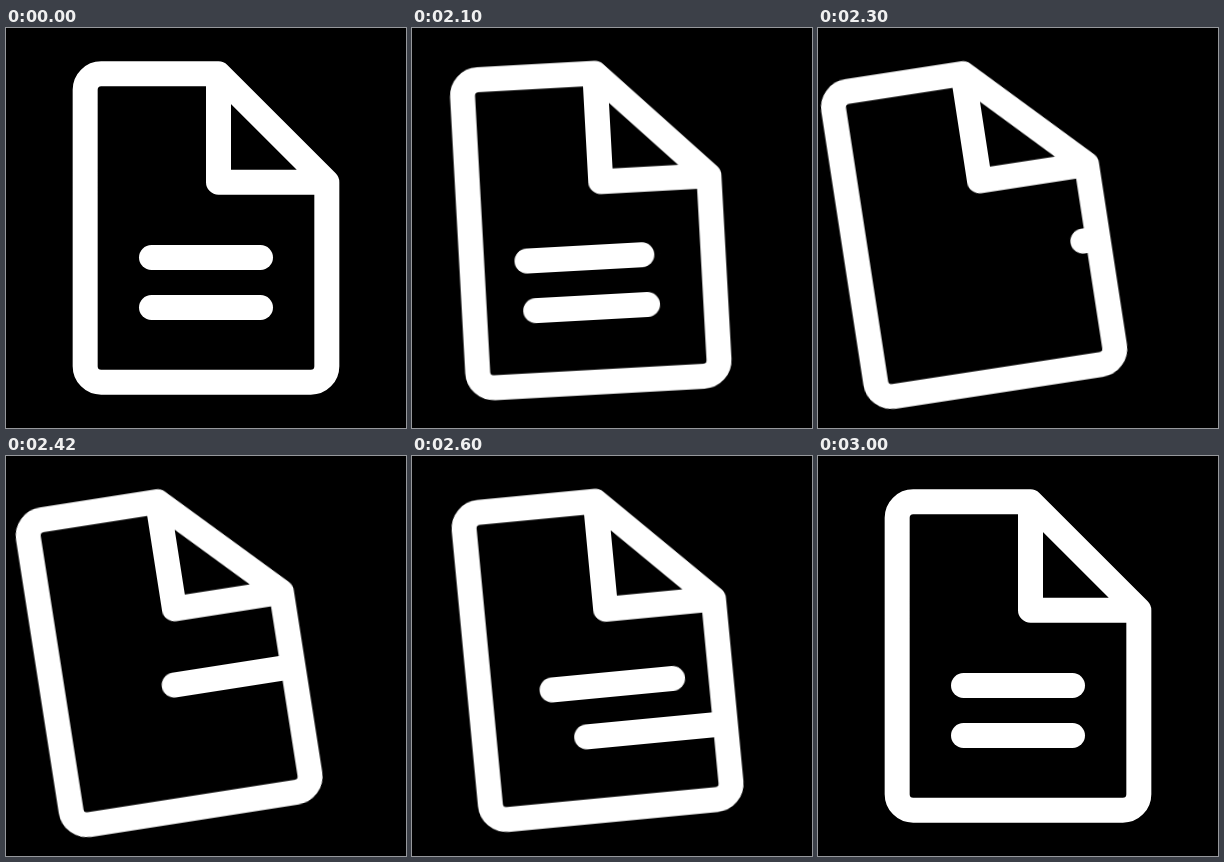
Recreate the animation shown at these times as an HTML page. Size 400 px wide and 400 px high, loop 3020 ms.

```html
<!DOCTYPE html>
<html lang="en">
<head>
<meta charset="utf-8">
<title>Document icon</title>
<style>
  html, body {
    margin: 0;
    width: 100%;
    height: 100%;
    overflow: hidden;
    background: #000;
  }

  .stage {
    position: relative;
    width: 100%;
    height: 100%;
    overflow: clip;
    contain: paint;
  }

  .doc, .lines, svg {
    position: absolute;
    left: 0;
    top: 0;
    width: 400px;
    height: 400px;
  }

  .doc, .line {
    animation-duration: 3020ms;
    animation-iteration-count: infinite;
    animation-timing-function: linear;
  }

  .doc { animation-name: slide, tilt; }

  path {
    fill: none;
    stroke: #fff;
    stroke-width: 25;
    stroke-linejoin: round;
    stroke-linecap: round;
  }

  /* Lines vanish behind the middle of the page outline */
  .lines { clip-path: inset(0 79.17px); }

  .line {
    position: absolute;
    left: 133.33px;
    right: 133.33px;
    height: 25px;
    border-radius: 12.5px;
    background: #fff;
  }
  .first  { top: 216.67px; animation-name: first-left, first-right; }
  .second { top: 266.67px; animation-name: second-left, second-right; }

  @keyframes slide {
    0%, 66.225% { translate: 0; animation-timing-function: cubic-bezier(.333, 0, .667, 1); }
    73.179% { translate: -45px; animation-timing-function: cubic-bezier(.46, 0, .3, 1); }
    99.338%, 100% { translate: 0; }
  }
  @keyframes tilt {
    0%, 66.225% { rotate: 0deg; animation-timing-function: cubic-bezier(.28, 0, .31, 1); }
    78.477% { rotate: -9deg; animation-timing-function: cubic-bezier(.46, 0, .3, 1); }
    99.338%, 100% { rotate: 0deg; }
  }

  /* Each end leaves on the left, then returns from the right */
  @keyframes first-left {
    0%, 66.225% { left: 133.33px; animation-timing-function: cubic-bezier(.333, 0, .667, 0); }
    74.834%, 75.66% { left: -67px; }
    75.67% { left: 313.33px; animation-timing-function: cubic-bezier(.25, 1, .5, 1); }
    93.377%, 100% { left: 133.33px; }
  }
  @keyframes first-right {
    0%, 67.053% { right: 133.33px; animation-timing-function: cubic-bezier(.333, 0, .667, 0); }
    75.66% { right: 333px; }
    75.67%, 78.311% { right: -46.67px; animation-timing-function: cubic-bezier(.25, 1, .5, 1); }
    96.026%, 100% { right: 133.33px; }
  }
  @keyframes second-left {
    0%, 67.053% { left: 133.33px; animation-timing-function: cubic-bezier(.333, 0, .667, 0); }
    75.662%, 76.49% { left: -67px; }
    76.5%, 80.298% { left: 313.33px; animation-timing-function: cubic-bezier(.25, 1, .5, 1); }
    98.013%, 100% { left: 133.33px; }
  }
  @keyframes second-right {
    0%, 67.881% { right: 133.33px; animation-timing-function: cubic-bezier(.333, 0, .667, 0); }
    76.49% { right: 333px; }
    76.5%, 82.616% { right: -46.67px; animation-timing-function: cubic-bezier(.25, 1, .5, 1); }
    99.338%, 100% { right: 133.33px; }
  }
</style>
</head>
<body>
  <div class="stage">
    <div class="doc">
      <div class="lines">
        <div class="line first"></div>
        <div class="line second"></div>
      </div>
      <svg viewBox="0 0 400 400">
        <path d="M212.5 45.83H95.17a16 16 0 0 0-16 16V338.17a16 16 0 0 0 16 16H304.83a16 16 0 0 0 16-16V154.17ZV154.17H320.83"/>
      </svg>
    </div>
  </div>
</body>
</html>
```
